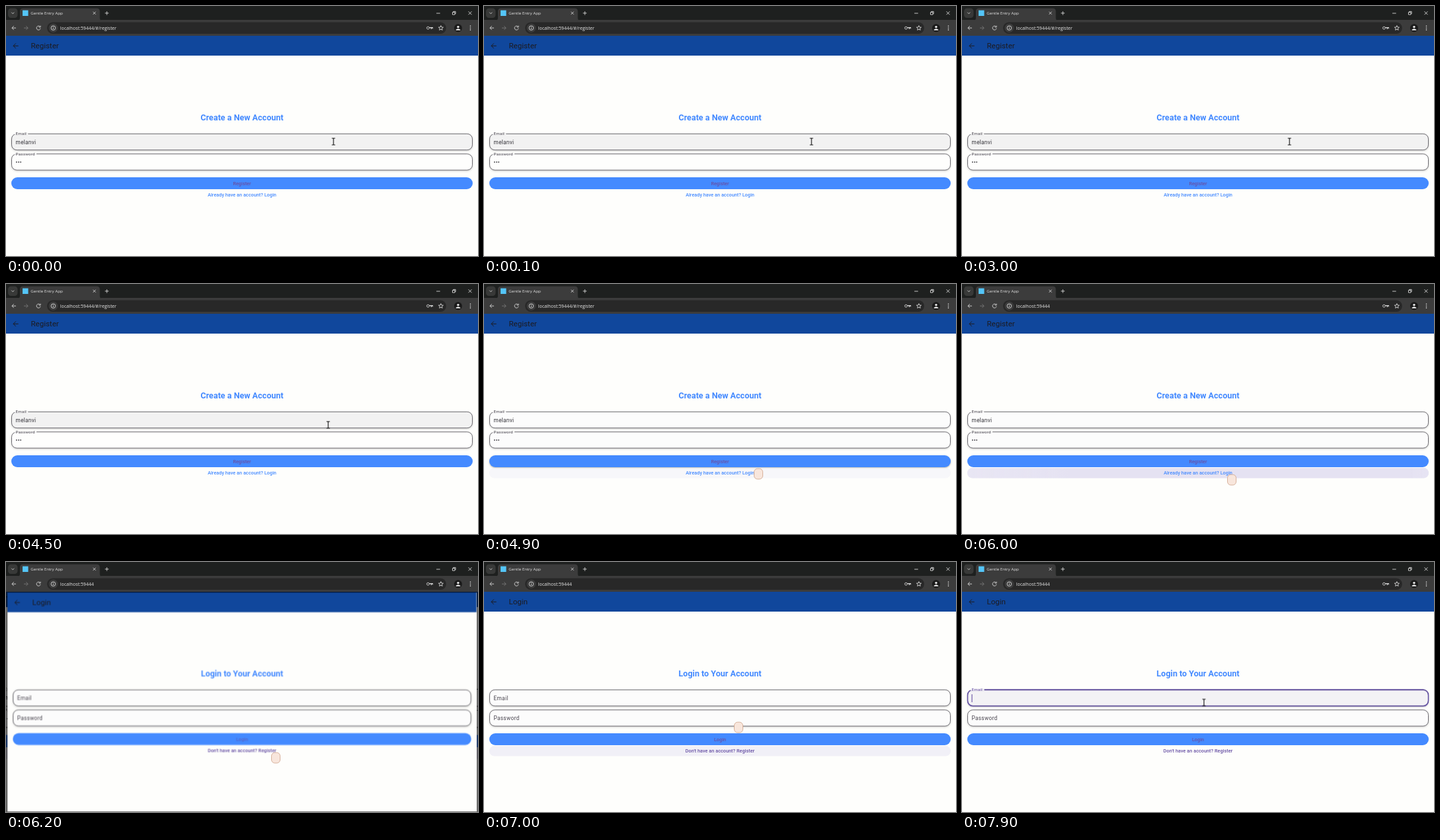
These frames come from a looping animation (712 by 378 pixels, 8000 ms). An HTML page:

```html
<!DOCTYPE html>
<html lang="en">
<head>
<meta charset="utf-8">
<title>Account form</title>
<style>
html, body { margin: 0; width: 100%; height: 100%; overflow: hidden; background: #fefefc; }
svg { display: block; width: 712px; height: 378px; font-family: Roboto, sans-serif; }
.ui { font-family: "Open Sans", "Noto Sans", sans-serif; fill: #e6e6e6; }
.icon { fill: none; stroke: #d6d6d6; stroke-width: .9; }
.title { font-size: 11.5px; fill: #1d1b20; }
.head { font-size: 12.55px; font-weight: 700; fill: #448aff; text-anchor: middle; }
.label { font-size: 6.25px; letter-spacing: .2px; fill: #49454f; }
.value { font-size: 8.3px; letter-spacing: .26px; fill: #333238; }
.hint { fill: #49454f; }
.btn { font-size: 7.25px; font-weight: 500; letter-spacing: .03px; fill: #6750a4; text-anchor: middle; }
.blue { fill: #448aff; }
.field { stroke: #55535a; stroke-width: .85; filter: drop-shadow(0 1.5px 1.8px rgba(0, 0, 0, .2)); }
.pill { fill: #f1f0f7; }

/* One loop is 8 s; every change is a hard step on a 100 ms grid (1.25%). */
.a { animation: 8s step-end infinite; }
#pointer { animation-name: move; }
#beam { animation-name: beam; }
#hand { animation-name: hand; }
#urlLong { animation-name: urlLong; }
#urlShort { animation-name: urlShort; }
#regEmail { animation-name: regEmail; }
#regPass { animation-name: regPass; }
#regBtn { animation-name: lift; }
#regPill { animation-name: regPill; }
#ripple { animation-name: ripple; transform-origin: 400px 286px; }
#reg { animation-name: leave; transform-origin: 356px 211px; }
#scrim { animation-name: scrim; }
#login { animation-name: enter; transform-origin: 356px 211px; }
#logEmail { animation-name: logEmail; }
#logPass { animation-name: logPass; }
#logPill { animation-name: logPill; }
#logBtnText { animation-name: textIn; }
#float { animation-name: float; }
#notch { animation-name: notch; transform-origin: 23px 0; }
#caret { animation-name: caret; }

@keyframes move {
  0% { transform: translate(494px, 205px); }
  56.25% { transform: translate(486px, 213px); }
  57.5% { transform: translate(462px, 237px); }
  58.75% { transform: translate(437px, 263px); }
  60% { transform: translate(421px, 279px); }
  61.25% { transform: translate(414px, 287px); }
  62.5% { transform: translate(413px, 288px); }
  63.75% { transform: translate(412px, 289px); }
  65% { transform: translate(411px, 290px); }
  66.25% { transform: translate(410px, 290.5px); }
  67.5% { transform: translate(408px, 294px); }
  68.75% { transform: translate(407px, 296px); }
  87.5% { transform: translate(384px, 250px); }
  88.75% { transform: translate(375px, 235px); }
  90% { transform: translate(369px, 222px); }
  91.25% { transform: translate(366px, 215px); }
  92.5%, 100% { transform: translate(365px, 212.5px); }
}
@keyframes beam { 0% { opacity: 1; } 58.75% { opacity: 0; } 88.75%, 100% { opacity: 1; } }
@keyframes hand { 0% { opacity: 0; } 58.75% { opacity: 1; } 88.75%, 100% { opacity: 0; } }
@keyframes urlLong { 0% { opacity: 1; } 75%, 100% { opacity: 0; } }
@keyframes urlShort { 0% { opacity: 0; } 75%, 100% { opacity: 1; } }
@keyframes regEmail { 0% { fill: #f2f2f2; } 57.5% { fill: #f6f6f6; } 58.75%, 100% { fill: #fcfcfc; } }
@keyframes regPass { 0% { fill: #fefefd; } 57.5% { fill: #f3f3f3; } 58.75% { fill: #f8f8f8; } 60%, 100% { fill: #fcfcfc; } }
@keyframes lift {
  0% { filter: none; }
  58.75% { filter: drop-shadow(0 1px 1px rgba(0, 0, 0, .3)); }
  63.75%, 100% { filter: none; }
}
@keyframes regPill { 0% { opacity: 0; } 61.25% { opacity: .55; } 62.5% { opacity: .85; } 63.75%, 100% { opacity: 1; } }
@keyframes ripple {
  0% { transform: scale(0); }
  72.5% { transform: scale(1); }
  73.75% { transform: scale(2); }
  75%, 100% { transform: scale(3.6); }
}
@keyframes leave { 0% { transform: none; } 77.5%, 100% { transform: scale(1.05); } }
@keyframes scrim { 0% { opacity: 0; } 77.5%, 100% { opacity: .6; } }
@keyframes enter {
  0% { opacity: 0; transform: scale(.9); }
  77.5% { opacity: 1; transform: scale(.9935); }
  78.75% { opacity: 1; transform: scale(.999); }
  80%, 100% { opacity: 1; transform: none; }
}
@keyframes logEmail { 0% { fill: #fcfcfc; } 90% { fill: #f7f7f7; } 91.25%, 100% { fill: #f3f2f5; } }
@keyframes logPass { 0% { fill: #fcfcfc; } 88.75% { fill: #f4f4f4; } 90%, 100% { fill: #fcfcfc; } }
@keyframes logPill { 0% { opacity: 0; } 80% { opacity: 1; } 88.75% { opacity: .4; } 90%, 100% { opacity: 0; } }
@keyframes textIn { 0% { opacity: .6; } 78.75%, 100% { opacity: 1; } }
@keyframes float {
  0% { transform: translate(14.6px, 208.6px); fill: #49454f; }
  96.25% { transform: translate(14.6px, 204px) scale(.91); fill: #5a4c80; }
  97.5% { transform: translate(14.6px, 197px) scale(.79); fill: #6750a4; }
  98.75%, 100% { transform: translate(14.6px, 195.4px) scale(.753); fill: #6750a4; }
}
@keyframes notch {
  0% { transform: scaleX(0); }
  96.25% { transform: scaleX(.4); }
  97.5% { transform: scaleX(.9); }
  98.75%, 100% { transform: none; }
}
#focus { animation-name: focus; }
@keyframes focus { 0% { opacity: 0; } 96.25% { opacity: .5; } 97.5%, 100% { opacity: 1; } }
@keyframes caret { 0% { opacity: 0; } 97.5%, 100% { opacity: 1; } }
</style>
</head>
<body>
<svg viewBox="0 0 712 378">
  <defs>
    <clipPath id="view"><rect y="45" width="712" height="333"/></clipPath>
    <clipPath id="pillClip"><rect x="8" y="278" width="696" height="15.6" rx="7.8"/></clipPath>
    <linearGradient id="soft">
      <stop offset="0" stop-color="#e5e2f2" stop-opacity=".7"/>
      <stop offset=".2" stop-color="#e5e2f2"/>
      <stop offset=".85" stop-color="#e5e2f2"/>
      <stop offset="1" stop-color="#e5e2f2" stop-opacity=".5"/>
    </linearGradient>
    <rect id="box" x="8.5" width="695" height="24.4" rx="7.8"/>
    <g id="base">
      <rect y="45" width="712" height="333" fill="#fefefc"/>
      <rect y="45" width="712" height="30" fill="#10479c"/>
      <path d="M18.7 60.3H11.2M14.8 56.5L11 60.3L14.8 64.1" fill="none" stroke="#1d1b20"/>
    </g>
    <rect id="bar" x="8" y="259" width="696" height="18" rx="9" fill="#448aff"/>
    <rect id="link" x="8" y="278" width="696" height="15.6" rx="7.8"/>
  </defs>

  <g clip-path="url(#view)">
    <g id="reg" class="a">
      <use href="#base"/>
      <text class="title" x="37.5" y="64.3">Register</text>
      <text class="head" x="356" y="173">Create a New Account</text>
      <use id="regEmail" class="field a" href="#box" y="193.3"/>
      <rect x="12.8" y="192.4" width="20.4" height="1.8" fill="#fbfbfa"/>
      <text class="label" x="14.6" y="195.4">Email</text>
      <text class="value" x="14.6" y="208.6">melanvi</text>
      <use id="regPass" class="field a" href="#box" y="223.7"/>
      <rect x="12.8" y="222.8" width="33.2" height="1.8" fill="#fbfbfa"/>
      <text class="label" x="14.6" y="225.8">Password</text>
      <text class="value" x="14.6" y="239">•••</text>
      <use id="regBtn" class="a" href="#bar"/>
      <text class="btn" x="356" y="270.8">Register</text>
      <use id="regPill" class="pill a" href="#link"/>
      <g clip-path="url(#pillClip)">
        <circle id="ripple" class="a" cx="400" cy="286" r="110" fill="url(#soft)"/>
      </g>
      <text class="btn blue" x="356" y="288.3">Already have an account? Login</text>
    </g>

    <rect id="scrim" class="a" y="45" width="712" height="333"/>

    <g id="login" class="a">
      <use href="#base"/>
      <text class="title" x="37.5" y="64.3">Login</text>
      <text class="head" x="356" y="173">Login to Your Account</text>
      <use id="logEmail" class="field a" href="#box" y="193.3"/>
      <use id="focus" class="a" href="#box" y="193.3" fill="none" stroke="#5f4ba3" stroke-width="1.5"/>
      <rect id="notch" class="a" x="12.8" y="192.2" width="20.8" height="2.2" fill="#fbfbfa"/>
      <text id="float" class="value hint a">Email</text>
      <rect id="caret" class="a" x="14.5" y="200" width="1.1" height="12" fill="#6750a4"/>
      <use id="logPass" class="field a" href="#box" y="223.7"/>
      <text class="value hint" x="14.6" y="239">Password</text>
      <use href="#bar"/>
      <text id="logBtnText" class="btn a" x="356" y="270.8">Login</text>
      <use id="logPill" class="pill a" href="#link"/>
      <text class="btn" x="356" y="288.3">Don't have an account? Register</text>
    </g>
  </g>

  <g id="browser">
    <rect width="712" height="22" fill="#1e201f"/>
    <rect y="21" width="712" height="24" fill="#3c3c3c"/>
    <rect x="3" y="3.5" width="14.5" height="14.5" rx="4.5" fill="#383938"/>
    <path d="M17 22Q21 22 21 18V8Q21 3.5 25.500 3.500H137Q141.500 3.500 141.500 8V18Q141.500 22 145.500 22Z" fill="#3c3c3c"/>
    <rect x="25" y="6.5" width="8.5" height="8.5" fill="#54c5f8"/>
    <text class="ui" x="37.3" y="13.2" font-size="6.15">Gentle Entry App</text>
    <rect x="62" y="24.5" width="602" height="17.5" rx="8.75" fill="#282828"/>
    <circle cx="71.3" cy="33.2" r="6.8" fill="#3c3c3c"/>
    <g class="icon">
      <path d="M8.300 9.700L10.300 11.700L12.300 9.700"/>
      <path d="M131.300 8.700L135.300 12.700M135.300 8.700L131.300 12.700"/>
      <path d="M149.300 10.800H154.900M152.100 8V13.600"/>
      <path d="M649.200 11H654.800M673.500 9.500H677V13H673.500ZM674.700 9.300V8.300H678.200V11.800H677.200M697.500 8.200L702.500 13.200M702.500 8.200L697.500 13.200"/>
      <path d="M15 33.200H9M11.800 30.300L8.900 33.200L11.800 36.100"/>
      <path d="M27 33.200H33M30.300 30.300L33.200 33.200L30.300 36.100" stroke="#777"/>
      <path d="M51.300 31.200A3 3 0 1 0 52 33.800M52 29.700V32H49.500"/>
      <circle cx="71.3" cy="33.2" r="3.3"/>
      <path d="M71.300 32.700V35M71.300 31V31.900"/>
      <circle cx="636.6" cy="33.2" r="1.9"/>
      <path d="M638.500 32.700H643.500V34.200M641.500 32.700V35" stroke-width="1.2"/>
      <path d="M656 29.600L657 32L659.600 32.200L657.600 33.900L658.200 36.400L656 35.100L653.800 36.400L654.400 33.900L652.400 32.200L655 32Z"/>
    </g>
    <circle cx="682" cy="33.2" r="6" fill="#1b1b1b"/>
    <g fill="#ededed">
      <circle cx="682" cy="31.6" r="1.7"/>
      <path d="M678.600 36.700V35.800Q682 32.700 685.400 35.800V36.700Z"/>
      <circle cx="700.5" cy="30.3" r=".8"/>
      <circle cx="700.5" cy="33.2" r=".8"/>
      <circle cx="700.5" cy="36.1" r=".8"/>
    </g>
    <g class="ui" font-size="6.93">
      <text id="urlLong" class="a" x="81.8" y="35.7">localhost:59444/#/register</text>
      <text id="urlShort" class="a" x="81.8" y="35.7">localhost:59444</text>
    </g>
  </g>

  <g id="pointer" class="a">
    <path id="beam" class="a" d="M-2.500 -5H-.6L0 -4.500L.6 -5H2.500M0 -4.500V4.500M-2.500 5H-.6L0 4.500L.6 5H2.500" fill="none" stroke="#111" stroke-width="1.1"/>
    <rect id="hand" class="a" x="-6.5" y="-7.8" width="13" height="15.8" rx="5" fill="#f8e6dc" stroke="#cfa288" stroke-width=".8"/>
  </g>
</svg>
</body>
</html>
```
